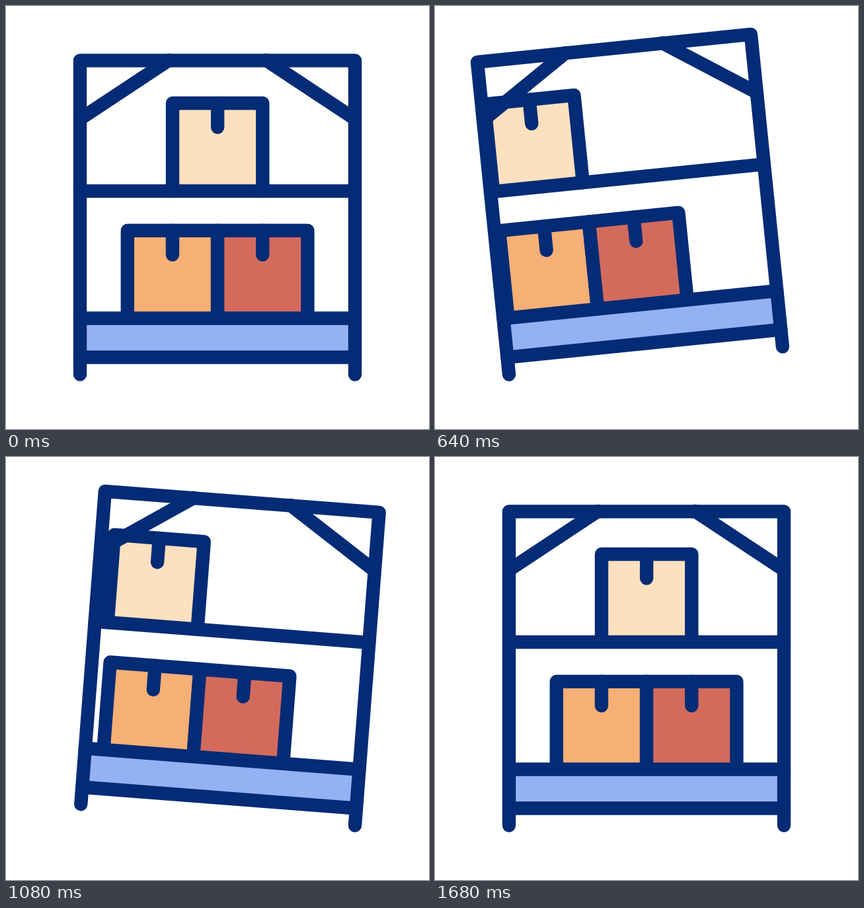
Animation, 640 px wide and 640 px high, one loop 2 s. Source, as an HTML page with a canvas:

```html
<!DOCTYPE html>
<html lang="en">
<head>
<meta charset="utf-8">
<title>Rocking shelf</title>
<style>
  html, body { margin: 0; width: 100%; height: 100%; overflow: hidden; background: #fff; }
  canvas { display: block; width: 100vmin; height: 100vmin; }
</style>
</head>
<body>
<canvas id="stage" width="640" height="640"></canvas>
<script>
const ctx = document.getElementById('stage').getContext('2d');
const LOOP = 2000, STEP = 40;
const NAVY = '#042b75', BLUE = '#93b1f3';
const PEACH = '#fce0bf', ORANGE = '#f6af75', RED = '#d36b5d';
const LEFT = 112, RIGHT = 528, FLOOR = 557.5;

// Keys are [time in ms, value]; tilt is in degrees, clockwise positive.
const TILT = [[80, 0], [640, -5.8], [873, 0], [920, 1.1], [1080, 4.42],
              [1200, 7.45], [1245, 7.9], [1400, 5.25], [1680, 0]];
const UPPER_SLIDE = [[80, 0], [640, -135.7], [1036, -135.7], [1440, 0]];
const LOWER_SLIDE = [[80, 0], [424, -64.6], [914, -64.6], [1437, 0]];

function valueAt(keys, t) {
  if (t <= keys[0][0]) return keys[0][1];
  for (let i = 1; i < keys.length; i++) {
    const [t0, v0] = keys[i - 1], [t1, v1] = keys[i];
    if (t <= t1) return v0 + (v1 - v0) * (t - t0) / (t1 - t0);
  }
  return keys[keys.length - 1][1];
}

function line(...points) {
  ctx.beginPath();
  for (let i = 0; i < points.length; i += 2) ctx.lineTo(points[i], points[i + 1]);
  ctx.stroke();
}

function box(x, top, bottom, color) {
  const width = 136.3, middle = x + width / 2;
  ctx.fillStyle = color;
  ctx.fillRect(x, top, width, bottom - top);
  line(x, bottom, x, top, x + width, top, x + width, bottom);
  line(middle, top, middle, top + 36.5);
}

function rack() {
  ctx.fillStyle = BLUE;
  ctx.fillRect(LEFT, 472.5, RIGHT - LEFT, 59);
  line(LEFT, FLOOR, LEFT, 82.5, RIGHT, 82.5, RIGHT, FLOOR);
  for (const y of [280, 472.5, 531.5]) line(LEFT, y, RIGHT, y);
  line(LEFT, 171, 246.5, 82);
  line(RIGHT, 171, 393.5, 82);
}

function draw(t) {
  const tilt = valueAt(TILT, t);
  const pivot = tilt < 0 ? LEFT : RIGHT;
  ctx.fillStyle = '#fff';
  ctx.fillRect(0, 0, 640, 640);

  ctx.save();
  ctx.translate(pivot, FLOOR);
  ctx.rotate(tilt * Math.PI / 180);
  ctx.translate(-pivot, -FLOOR);
  ctx.strokeStyle = NAVY;
  ctx.lineWidth = 20.4;
  ctx.lineCap = ctx.lineJoin = 'round';

  const upper = valueAt(UPPER_SLIDE, t), lower = valueAt(LOWER_SLIDE, t);
  box(252 + upper, 147, 280, PEACH);
  box(183.8 + lower, 339.8, 472.5, ORANGE);
  box(320.1 + lower, 339.8, 472.5, RED);
  rack();
  ctx.restore();
}

function frame() {
  const t = performance.now() % LOOP;
  draw(Math.floor(t / STEP) * STEP);
  requestAnimationFrame(frame);
}
frame();
</script>
</body>
</html>
```
